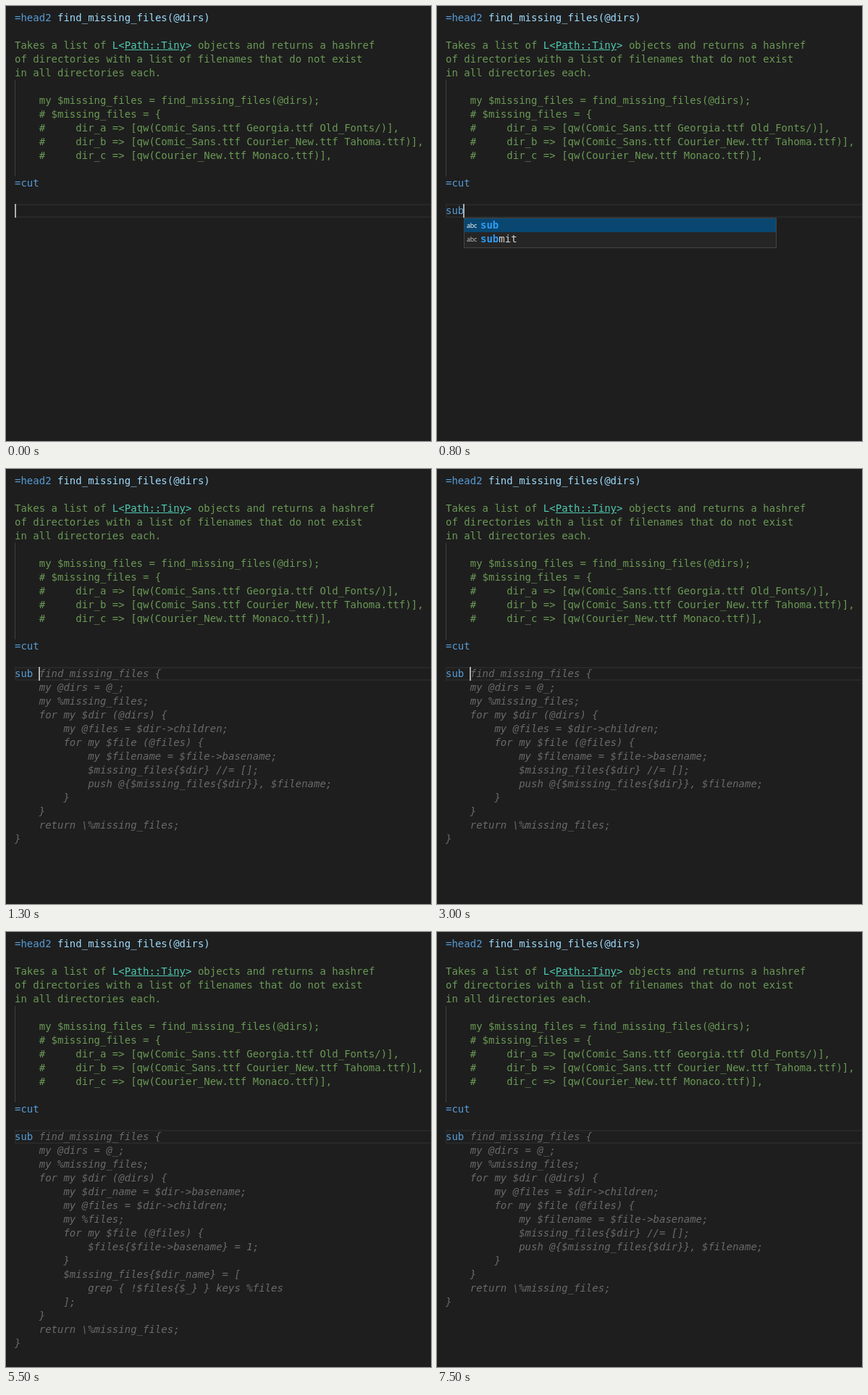
An HTML page for the animation above (8000 ms loop, 587 by 600 pixels).

```html
<!DOCTYPE html>
<html lang="en">
<head>
<meta charset="utf-8">
<title>Editor completion</title>
<style>
html, body { margin: 0; width: 100%; height: 100%; overflow: hidden; background: #1e1e1e; }
#stage { position: relative; width: 587px; height: 600px; overflow: hidden; background: #1e1e1e; }
#stage > * { position: absolute; box-sizing: border-box; }
pre { margin: 0; left: 12px; font: 14px/19px "DejaVu Sans Mono", monospace; color: #6a9955; font-variant-ligatures: none; }
.key { color: #569cd6; }
.name { color: #9cdcfe; }
.link { color: #4ec9b0; }
.link u { text-decoration: underline; }
#doc { top: 7px; }
#typed, .ghost { top: 273px; }
.ghost { font-style: italic; color: #6a6a6a; }
#line { left: 12px; top: 273px; width: 600px; height: 19px; border: 2px solid #282828; }
#guide { left: 12px; top: 102px; width: 1px; height: 133px; background: #404040; }
#caret { top: 273px; width: 2px; height: 19px; background: #aeafad; }
#popup { left: 37px; top: 292px; width: 432px; height: 42px; background: #252526; border: 1px solid #454545; }
.row { position: relative; height: 19px; padding-left: 22px; font: 14px/19px "DejaVu Sans Mono", monospace; color: #d4d4d4; }
.row.on { background: #094771; }
.row b { color: #2f9df4; }
.row i { position: absolute; left: 3px; top: 0; font: 9px/19px "Open Sans", sans-serif; letter-spacing: -0.2px; color: #c5c5c5; }
.row.on i { color: #fff; }
</style>
</head>
<body>
<div id="stage">
<div id="line"></div>
<div id="guide"></div>
<pre id="doc"><span class="key">=head2</span> <span class="name">find_missing_files(@dirs)</span>

Takes a list of <span class="link">L&lt;<u>Path::Tiny</u>&gt;</span> objects and returns a hashref
of directories with a list of filenames that do not exist
in all directories each.

    my $missing_files = find_missing_files(@dirs);
    # $missing_files = {
    #     dir_a =&gt; [qw(Comic_Sans.ttf Georgia.ttf Old_Fonts/)],
    #     dir_b =&gt; [qw(Comic_Sans.ttf Courier_New.ttf Tahoma.ttf)],
    #     dir_c =&gt; [qw(Courier_New.ttf Monaco.ttf)],

<span class="key">=cut</span></pre>
<pre id="typed"></pre>
<pre class="ghost">    find_missing_files {
    my @dirs = @_;
    my %missing_files;
    for my $dir (@dirs) {
        my @files = $dir-&gt;children;
        for my $file (@files) {
            my $filename = $file-&gt;basename;
            $missing_files{$dir} //= [];
            push @{$missing_files{$dir}}, $filename;
        }
    }
    return \%missing_files;
}</pre>
<pre class="ghost">    find_missing_files {
    my @dirs = @_;
    my %missing_files;
    for my $dir (@dirs) {
        my $dir_name = $dir-&gt;basename;
        my @files = $dir-&gt;children;
        my %files;
        for my $file (@files) {
            $files{$file-&gt;basename} = 1;
        }
        $missing_files{$dir_name} = [
            grep { !$files{$_} } keys %files
        ];
    }
    return \%missing_files;
}</pre>
<div id="caret"></div>
<div id="popup">
<div class="row on"><i>abc</i><b>sub</b></div>
<div class="row"><i>abc</i><b>sub</b>mit</div>
</div>
</div>
<script>
const LOOP = 8000;
const WORD = "sub ";
const CARET_X = [12, 19, 28, 36, 45];

// Each track is a list of [start ms, value].
const typedTrack = [[0, 0], [600, 1], [700, 2], [800, 3], [900, 4]];
const popupTrack = [[0, false], [800, true], [900, false]];
const ghostTrack = [[0, -1], [1300, 0], [3500, 1], [5800, 0]];
const caretTrack = [0, 300, 600, 1500, 2100, 2700, 3000, 3500, 4000, 4600,
  5000, 5500, 6000, 6600, 7100, 7500].map((t, i) => [t, i % 2 === 0]);

const $ = id => document.getElementById(id);
const ghosts = document.querySelectorAll(".ghost");
const typed = $("typed"), caret = $("caret"), popup = $("popup");

const at = (track, t) => track.reduce((v, [start, value]) => t >= start ? value : v, track[0][1]);
const show = (el, on) => { el.style.visibility = on ? "visible" : "hidden"; };

function draw(t) {
  const count = at(typedTrack, t);
  const ghost = at(ghostTrack, t);
  typed.textContent = WORD.slice(0, count);
  typed.style.color = count < 3 ? "#d4d4d4" : "#569cd6";
  caret.style.left = CARET_X[count] + "px";
  show(caret, at(caretTrack, t));
  show(popup, at(popupTrack, t));
  ghosts.forEach((el, i) => show(el, i === ghost));
}

const begin = performance.now();
function tick() {
  draw((performance.now() - begin) % LOOP);
  requestAnimationFrame(tick);
}
tick();
</script>
</body>
</html>
```
